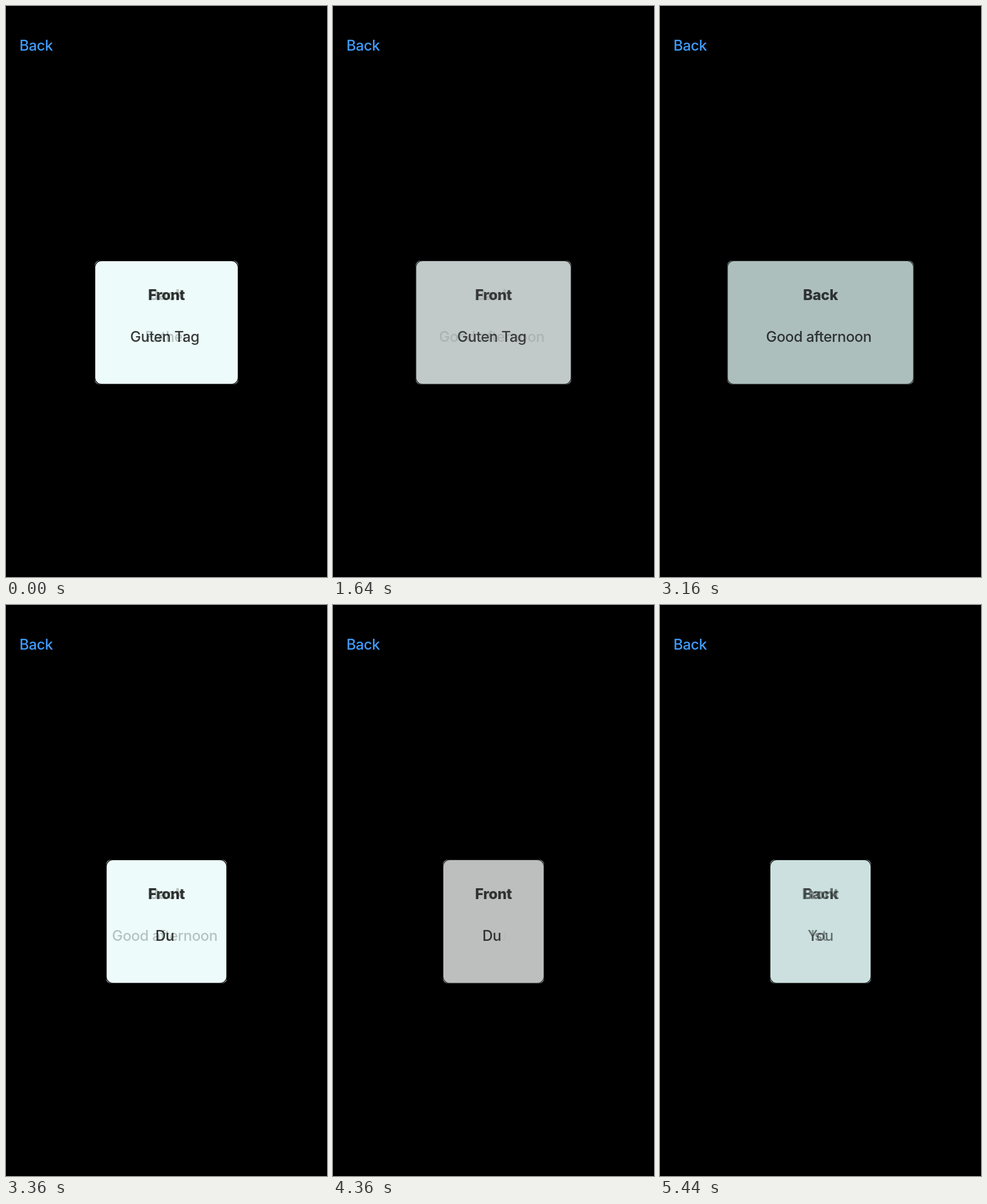
An HTML page for the animation above (5480 ms loop, 561x998 px).

```html
<!DOCTYPE html>
<html lang="en">
<head>
<meta charset="utf-8">
<title>Flip card</title>
<style>
  html, body { margin: 0; width: 100%; height: 100%; overflow: hidden; background: #000; }
  svg { display: block; width: 561px; height: 998px; }
  text {
    font: 500 25.4px Inter, "Liberation Sans", sans-serif;
    letter-spacing: -0.4px;
    text-anchor: middle;
  }
  .head { font-weight: 800; letter-spacing: -0.3px; }
  .nav { fill: #409cff; text-anchor: start; }
</style>
</head>
<body>
<svg viewBox="0 0 561 998">
  <text class="nav" x="23.5" y="78">Back</text>
  <rect id="fill" y="445" height="216.5" rx="9"/>
  <rect id="edge" y="445.25" height="216" rx="12" fill="none" stroke="#000" stroke-width="1.5"/>
  <g id="old"><text class="head" y="513.5"></text><text y="587"></text></g>
  <g id="new"><text class="head" y="513.5"></text><text y="587"></text></g>
</svg>
<script>
const LOOP = 5480, STEP = 40, FADE = 350, MID = 280.5;
const $ = id => document.getElementById(id);
const fill = $('fill'), edge = $('edge');

// Words with a trailing space sit 3px left of the middle.
const card = (side, word, width, x = MID) => ({ side, word, width, x });
const cards = [
  card('Back', 'Father', 209),
  card('Front', 'Guten Tag', 262, MID - 3),
  card('Back', 'Good afternoon', 328, MID - 3),
  card('Front', 'Du', 176, MID - 3),
  card('Back', 'You', 176),
  card('Front', 'Ist', 176, MID - 3)
];
const starts = [-235, 1550, 3125, 4325, 5282];

const clamp = v => Math.max(0, Math.min(1, v));
const mix = (a, b, k) => a + (b - a) * k;

// cubic-bezier(.42, 0, .58, 1)
function ease(x) {
  let lo = 0, hi = 1;
  for (let i = 0; i < 24; i++) {
    const s = (lo + hi) / 2, r = 1 - s;
    if (3 * r * r * s * .42 + 3 * r * s * s * .58 + s ** 3 < x) lo = s; else hi = s;
  }
  return lo * lo * (3 - 2 * lo);
}

// Opacity of the pressed button: quick dip, slower release.
const press = dt => dt < 60
  ? mix(1, .75, clamp((dt + 55) / 80))
  : mix(.75, 1, clamp((dt - 60) / 185));

function place(rect, width, inset) {
  rect.setAttribute('x', MID - width / 2 + inset);
  rect.setAttribute('width', width - 2 * inset);
}

function label(id, { side, word, x }, opacity) {
  const g = $(id), [head, body] = g.children;
  head.textContent = side;
  head.setAttribute('x', MID);
  body.textContent = word;
  body.setAttribute('x', x);
  head.style.opacity = body.style.opacity = opacity;
}

function draw(now) {
  const t = Math.floor((now % LOOP) / STEP) * STEP;
  const i = starts.findLastIndex(s => t >= s - 45);
  const dt = t - starts[i], from = cards[i], to = cards[i + 1];
  const p = dt <= 0 ? 0 : dt >= FADE ? 1 : ease(dt / FADE);
  const dim = press(dt);
  const white = (to.side === 'Front' ? p : 1 - p) ** 3.5;
  const width = mix(from.width, to.width, p) + 2;

  place(fill, width, .5);
  place(edge, width, .75);
  fill.style.fill = `rgb(${mix(231, 254, white)}, ${mix(255, 254, white)}, ${mix(253, 254, white)})`;
  fill.style.opacity = edge.style.opacity = dim;
  label('old', from, (1 - p) * dim);
  label('new', to, p * dim);
}

function tick(now) {
  draw(now);
  requestAnimationFrame(tick);
}
draw(0);
requestAnimationFrame(tick);
</script>
</body>
</html>
```
